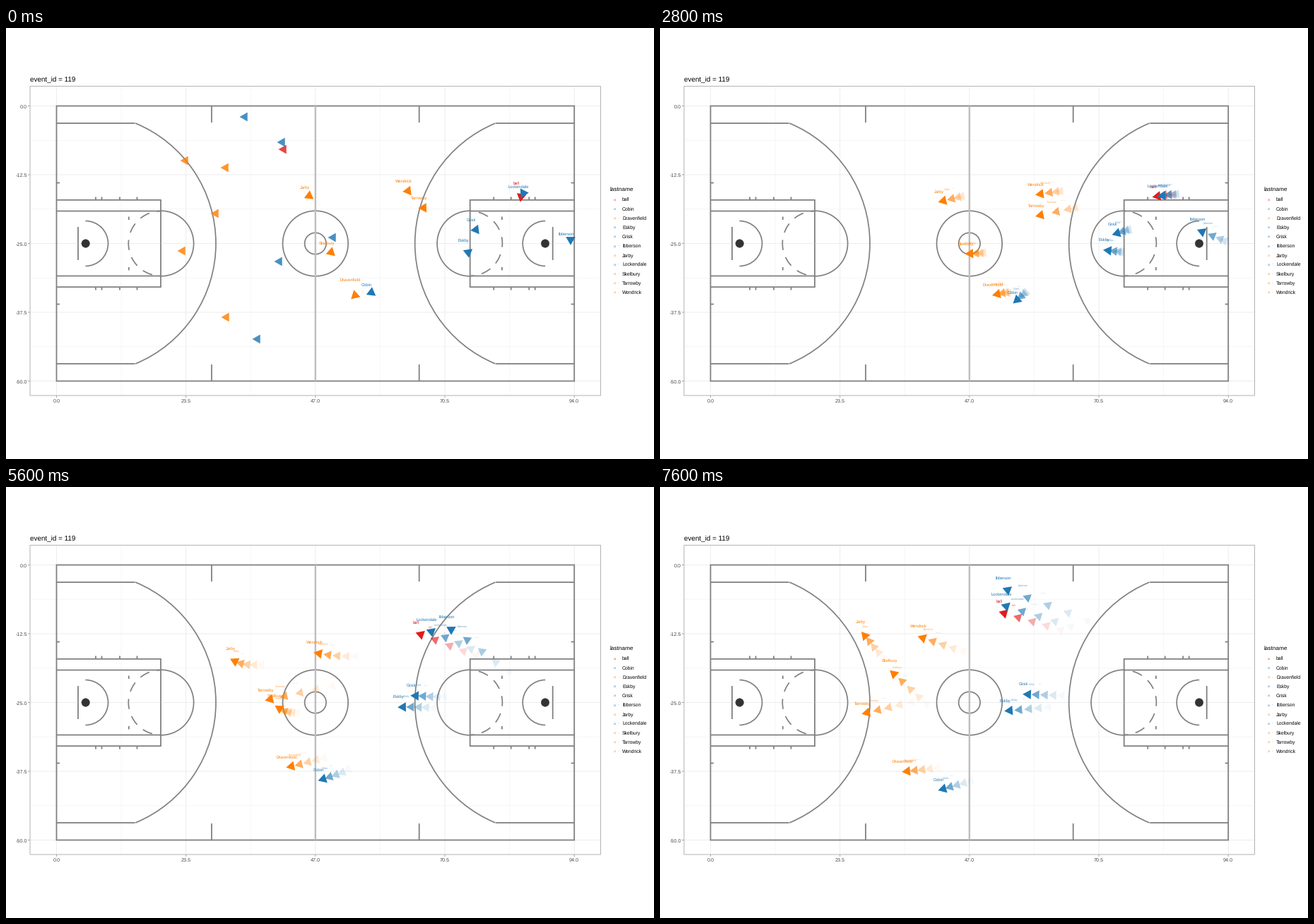
These frames come from a looping animation (917x611 px, 8 s). A matplotlib script:

```python
import numpy as np
import matplotlib.pyplot as plt
from matplotlib.animation import FuncAnimation
from matplotlib.patches import Arc, Circle, Polygon, Rectangle

W, H, DPI = 917, 611, 64
PX = 72 / DPI  # points per pixel
FRAMES, INTERVAL = 20, 400
RED, BLUE, ORANGE = "#E31A1C", "#1F78B4", "#FF7F00"
LINE = "#808080"
LEFT, RIGHT, TOP, BOTTOM = 71.5, 804.2, 110.5, 500.5
MID_X, MID_Y = (LEFT + RIGHT) / 2, (TOP + BOTTOM) / 2
LABEL_SIZE = 5.7
WAKE = [((5 - age) / 5) ** 2 for age in range(5)]
KEY_TIMES = np.array([0, 5, 10, 14, 19])

plt.rcParams.update({"font.family": "Liberation Sans", "path.snap": False,
                     "text.hinting": "none"})
fig = plt.figure(figsize=(W / DPI, H / DPI), dpi=DPI, facecolor="white")
ax = fig.add_axes([0, 0, 1, 1])
ax.set(xlim=(0, W), ylim=(H, 0))
ax.axis("off")


def write(x, y, text, size, color="black", ha="left", alpha=1, z=3):
    """Text whose capitals are centred on y, with the size in pixels."""
    return ax.text(x, y + 0.36 * size, text, fontsize=size * PX, color=color,
                   ha=ha, va="baseline", alpha=alpha, zorder=z)


def line(x0, y0, x1, y1, color=LINE, width=1.8, z=2):
    ax.plot([x0, x1], [y0, y1], color=color, lw=width * PX, zorder=z,
            solid_capstyle="butt")


def box(x0, y0, x1, y1, color=LINE, width=1.8):
    ax.add_patch(Rectangle((x0, y0), x1 - x0, y1 - y0, fill=False, ec=color,
                           lw=width * PX, zorder=2))


def arc(x, radius, start=0, end=360, style="-"):
    ax.add_patch(Arc((x, MID_Y), 2 * radius, 2 * radius, theta1=start,
                     theta2=end, color=LINE, lw=1.7 * PX, ls=style, zorder=2))


def draw_panel():
    for i in range(9):
        x = LEFT + (RIGHT - LEFT) * i / 8
        y = TOP + (BOTTOM - TOP) * i / 8
        major = i % 2 == 0
        shade, width = ("#EBEBEB", 0.9) if major else ("#F1F1F1", 0.6)
        line(x, 82.5, x, 521, shade, width, 1)
        line(34, y, 841.5, y, shade, width, 1)
        if major:
            line(x, 521, x, 524, "#999999", 0.9)
            line(31, y, 34, y, "#999999", 0.9)
            write(x, 528.5, f"{11.75 * i:.1f}", 7.3, "#4D4D4D", "center")
            write(30, y + 0.5, f"{-6.25 * i + 0:.1f}", 7.3, "#4D4D4D", "right")
    box(34, 82.5, 841.5, 521, "#B3B3B3", 1)
    write(34, 72.5, "event_id = 119", 9.9)


def draw_half(flip):
    def fx(x):
        return LEFT + RIGHT - x if flip else x

    def seg(x0, y0, x1, y1):
        """A segment and its reflection in the long axis of the court."""
        line(fx(x0), y0, fx(x1), y1)
        line(fx(x0), 2 * MID_Y - y0, fx(x1), 2 * MID_Y - y1)

    def half_arc(x, radius, spread=90, outward=True, style="-"):
        middle = 0 if outward != flip else 180
        arc(fx(x), radius, middle - spread, middle + spread, style)

    seg(LEFT, 135, 182.5, 135)
    half_arc(112.4, 184.6, np.degrees(np.arcsin(170.5 / 184.6)))
    seg(291, TOP, 291, 134)
    seg(LEFT, 243.8, 219, 243.8)
    seg(LEFT, 259.5, 219, 259.5)
    seg(219, 243, 219, MID_Y)
    half_arc(219.3, 46.3)
    half_arc(219.3, 46, outward=False, style=(7.4, (8.5, 6.3)))
    for x in (127, 135.5, 161, 185.5):
        seg(x, 239.5, x, 243)
    seg(LEFT, 219.5, 76, 219.5)
    seg(173.8, 267.5, 173.8, 272)
    seg(102, 282, 102, MID_Y)
    half_arc(112.5, 32)
    ax.add_patch(Circle((fx(112.7), MID_Y), 5.8, fc="#333333", ec="#4D4D4D",
                        lw=0.5, zorder=2))


def draw_court():
    box(LEFT, TOP, RIGHT, BOTTOM)
    draw_half(False)
    draw_half(True)
    arc(MID_X, 46.3)
    arc(MID_X, 15.2)
    line(MID_X, TOP, MID_X, BOTTOM, "#BEBEBE", 2.4)


def smooth_path(points):
    """Cubic Hermite curve through the key points, one row per frame."""
    keys = np.array(points, float)
    slopes = np.gradient(keys, KEY_TIMES, axis=0)
    t = np.arange(FRAMES)
    i = np.clip(np.searchsorted(KEY_TIMES, t, "right") - 1, 0, len(keys) - 2)
    span = (KEY_TIMES[i + 1] - KEY_TIMES[i])[:, None]
    u = (t - KEY_TIMES[i])[:, None] / span
    return ((2 * u**3 - 3 * u**2 + 1) * keys[i]
            + (u**3 - 2 * u**2 + u) * span * slopes[i]
            + (3 * u**2 - 2 * u**3) * keys[i + 1]
            + (u**3 - u**2) * span * slopes[i + 1])


class Mover:
    """A marker that rests at one spot, then runs along its key points."""

    def __init__(self, name, color, rest, *points):
        self.name, self.color, self.rest = name, color, rest
        self.path = smooth_path(points)
        step = np.gradient(self.path, axis=0)
        self.heading = np.arctan2(step[:, 1], step[:, 0])

    def triangle(self, x, y, heading, age):
        radius = 7.8 if age == 0 else 7.3
        angles = heading + np.arange(3) * 2 * np.pi / 3
        corners = np.column_stack([x + radius * np.cos(angles),
                                   y + radius * np.sin(angles)])
        return ax.add_patch(Polygon(corners, fc=self.color, lw=0,
                                    alpha=WAKE[age], zorder=4 - 0.1 * age))

    def draw(self, frame, age):
        now = frame - age
        if now < 0:
            return [self.triangle(*self.rest, np.pi, age)]
        x, y = self.path[now]
        heading = self.heading[now]
        artists = [self.triangle(x, y, heading, age)]
        if age <= 2:
            artists.append(write(x - 6.5, y - 15 + 7 * np.sin(heading),
                                 self.name, LABEL_SIZE * WAKE[age], self.color,
                                 "center", WAKE[age], 5))
        return artists


movers = [
    Mover("ball", RED, (393, 172),
          (729, 239), (721, 236), (665, 238), (587, 209), (487, 179)),
    Mover("Cobin", BLUE, (387, 331),
          (517, 375), (515, 377), (484, 401), (449, 414), (401, 428)),
    Mover("Dravenfield", ORANGE, (312, 410),
          (494, 379), (490, 375), (450, 384), (404, 396), (350, 403)),
    Mover("Eskby", BLUE, (463, 297),
          (654, 318), (649, 317), (605, 313), (562, 312), (495, 317)),
    Mover("Grisk", BLUE, (356, 441),
          (665, 286), (660, 287), (620, 297), (580, 296), (521, 294)),
    Mover("Ibberson", BLUE, (338, 126),
          (799, 300), (793, 299), (712, 262), (630, 202), (492, 146)),
    Mover("Jarby", ORANGE, (254, 188),
          (429, 238), (422, 240), (362, 252), (324, 247), (290, 211)),
    Mover("Lockendale", BLUE, (391, 162),
          (732, 234), (727, 236), (674, 235), (602, 205), (490, 169)),
    Mover("Skelbury", ORANGE, (297, 263),
          (460, 318), (454, 319), (412, 320), (387, 314), (331, 265)),
    Mover("Tarrowby", ORANGE, (250, 316),
          (591, 255), (578, 257), (462, 282), (374, 301), (293, 320)),
    Mover("Wendrick", ORANGE, (311, 198),
          (569, 231), (561, 232), (495, 240), (443, 236), (372, 214)),
]


def draw_legend():
    write(854, 228, "lastname", 8.2)
    for i, mover in enumerate(movers):
        y = 243 + 13.13 * i
        write(861.3, y, "a", 5.2, mover.color, "center", 0.8)
        if len(mover.name) > 5:
            write(866.2, y, "-", 4.5, mover.color, "center", 0.7)
        write(872, y, mover.name, 6.7)


draw_panel()
draw_court()
draw_legend()
live = []


def update(frame):
    while live:
        live.pop().remove()
    for age in range(4, -1, -1):
        for mover in movers:
            live.extend(mover.draw(frame, age))
    return live


animation = FuncAnimation(fig, update, frames=FRAMES, interval=INTERVAL,
                          init_func=lambda: [], repeat=True, repeat_delay=0,
                          blit=False)
plt.show()
```
